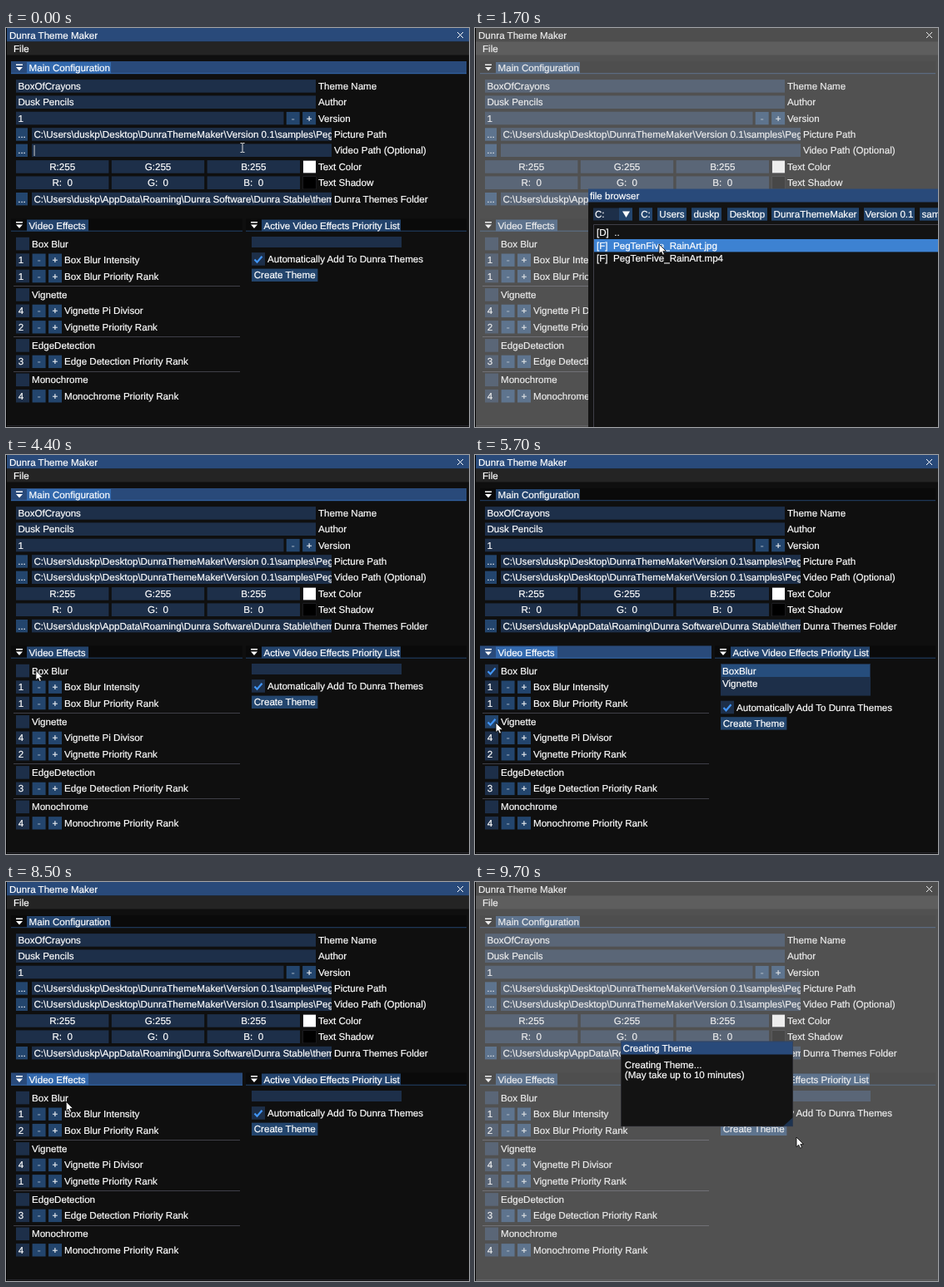
These frames come from a looping animation (556 by 480 pixels, 10000 ms). An HTML page:

```html
<!DOCTYPE html>
<html lang="en">
<head>
<meta charset="utf-8">
<title>Dunra Theme Maker</title>
<style>
  html, body { margin: 0; width: 100%; height: 100%; overflow: hidden; background: #000; }
  svg { display: block; width: 556px; height: 480px; }
  text {
    font: 11.6px "Liberation Sans", Arial, sans-serif;
    fill: #fff; stroke: #fff; stroke-width: .2px;
    white-space: pre; text-rendering: geometricPrecision;
  }
  .mid { text-anchor: middle; }
  .faint { opacity: .5; }
</style>
</head>
<body>
<svg id="stage" viewBox="0 0 556 480" xmlns="http://www.w3.org/2000/svg">
  <defs>
    <clipPath id="field"><rect x="31" y="60" width="360" height="160"/></clipPath>
  </defs>
  <g id="main"></g>
  <rect id="dim" x="1" width="555" height="480" fill="#ccc"/>
  <g id="browser"></g>
  <g id="progress"></g>
  <path id="arrow" d="M0 0V11.6L2.7 9.2 4.5 13.2 6.5 12.3 4.8 8.4H8.4Z" fill="#fff" stroke="#000" stroke-width=".8"/>
  <path id="beam" d="M-2.5-5.5H-.6L0-5 .6-5.5H2.5M0-5V5M-2.5 5.5H-.6L0 5 .6 5.5H2.5" fill="none" stroke="#ddd"/>
</svg>
<script>
const $ = id => document.getElementById(id);
const BG = '#0f0f0f', FRAME = '#1d2f49', BUTTON = '#23456d', TITLE = '#294a7a',
  IDLE_TITLE = '#0a0a0a', TAB = '#3369ad', IDLE_TAB = '#23436c',
  HOVER = '#387bcb', LINE = '#3f3f48', CHECK = '#4296fa';
let layer = $('main');
const hot = [];

function add(tag, attrs, parent = layer) {
  const el = document.createElementNS('http://www.w3.org/2000/svg', tag);
  for (const k in attrs) el.setAttribute(k, attrs[k]);
  parent.appendChild(el);
  return el;
}
const set = (el, k, v) => el.setAttribute(k, v);
const show = (el, on) => { el.style.display = on ? '' : 'none'; };
const box = (x, y, width, height, fill, parent) => add('rect', { x, y, width, height, fill }, parent);
const frame = (x, y, w, parent) => box(x, y - 7.9, w, 15.6, FRAME, parent);
const path = (d, fill, parent) => add('path', { d, fill }, parent);

// y is the vertical centre of the line
function label(s, x, y, cls = '', parent = layer) {
  const el = add('text', { x, y: y + 4, class: cls }, parent);
  el.textContent = s;
  return el;
}
function button(s, x, y, w, cls = 'mid') {
  const top = y - 7.7, h = 15.4;
  const r = box(x, top, w, h, BUTTON);
  hot.push({ r, x, y: top, w, h, cold: BUTTON, warm: HOVER });
  return [r, label(s, x + w / 2, y, cls)];
}
function checkbox(x, y, parent = layer) {
  const r = frame(x, y, 16, parent);
  hot.push({ r, x, y: y - 8, w: 16, h: 16, cold: FRAME, warm: BUTTON });
  return add('path', {
    d: `M${x + 3.5} ${y + .5}l3 3.2 6-7`, fill: 'none', stroke: CHECK, 'stroke-width': 2.2
  }, parent);
}
function spin(x, y) {
  button('-', x, y, 16, 'mid faint');
  button('+', x + 19.4, y, 16);
}
function panel(s, x, y, w, tabW) {
  const strip = box(x, y - 8, w, 15, IDLE_TITLE);
  const tab = box(x + 19, y - 7, tabW, 14, IDLE_TAB);
  const rule = box(x, y + 6.2, w, 1, IDLE_TAB);
  path(`M${x + 6} ${y - 4.5}h8v1.4h-8zM${x + 6} ${y - 1}h8l-4 4.5z`, '#fff');
  label(s, x + 21.6, y);
  return on => {
    set(strip, 'fill', on ? TITLE : IDLE_TITLE);
    set(tab, 'fill', on ? TAB : IDLE_TAB);
    set(rule, 'fill', on ? TAB : IDLE_TAB);
  };
}

// Window frame
box(1, 0, 555, 480, BG);
const titleBar = box(1, 0, 555, 16.5, TITLE);
label('Dunra Theme Maker', 4, 8.5);
add('path', { d: 'M542 5l7 7m0-7l-7 7', stroke: '#fff', 'stroke-width': 1 });
box(1, 16.5, 555, 16, '#242424');
label('File', 9, 25.3);
box(1, 478, 555, 1, '#26262b');

// Main configuration
const focusMain = panel('Main Configuration', 6, 48, 547, 101);
const folder = 'C:\\Users\\duskp\\Desktop\\DunraThemeMaker\\Version 0.1\\samples\\PegTenFive_RainArt';
[['BoxOfCrayons', 'Theme Name', 70], ['Dusk Pencils', 'Author', 89.3]].forEach(([v, name, y]) => {
  frame(12, y, 360);
  label(v, 14.5, y);
  label(name, 375, y);
});
frame(12, 108.6, 321.5);
label('1', 14.5, 108.6);
spin(336.7, 108.6);
label('Version', 375, 108.6);

function pathRow(v, name, y) {
  button('...', 12, y, 14);
  frame(31, y, 360);
  const g = add('g', { 'clip-path': 'url(#field)' });
  label(name, 394, y);
  return label(v, 33.4, y, '', g);
}
pathRow(folder + '.jpg', 'Picture Path', 128);
const videoPath = pathRow(folder + '.mp4', 'Video Path (Optional)', 147.3);
const caret = box(33.6, 141, .9, 13, '#ddd');
[[255, 'Text Color', 167, '#fff'], ['  0', 'Text Shadow', 186.3, '#000']].forEach(([v, name, y, c]) => {
  [...'RGB'].forEach((ch, i) => {
    const x = 12 + 114.8 * i;
    frame(x, y, 111.4);
    label(ch + ':' + v, x + 55.7, y, 'mid');
  });
  box(356.4, y - 7.9, 16, 15.6, '#29292e');
  box(357, y - 7.3, 15, 14.6, c);
  label(name, 375, y);
});
pathRow('C:\\Users\\duskp\\AppData\\Roaming\\Dunra Software\\Dunra Stable\\themes', 'Dunra Themes Folder', 205.7);

// Video effects
const focusFx = panel('Video Effects', 6, 237.5, 278, 74);
function rankRow(v, name, y) {
  frame(12, y, 16);
  const el = label(v, 14.7, y);
  spin(31.6, y);
  label(name, 70, y);
  return el;
}
function effect(name, y) {
  const mark = checkbox(12, y);
  label(name, 31, y);
  return mark;
}
const rule = y => box(9, y, 272, 1, LINE);
const blurMark = effect('Box Blur', 259.7);
rankRow('1', 'Box Blur Intensity', 279.2);
const blurRank = rankRow('1', 'Box Blur Priority Rank', 298.6);
rule(310);
const vigMark = effect('Vignette', 321);
rankRow('4', 'Vignette Pi Divisor', 340.4);
const vigRank = rankRow('2', 'Vignette Priority Rank', 359.8);
rule(371);
const edgeMark = effect('EdgeDetection', 382);
rankRow('3', 'Edge Detection Priority Rank', 401.4);
rule(413);
const monoMark = effect('Monochrome', 423.4);
rankRow('4', 'Monochrome Priority Rank', 442.8);
show(edgeMark, false);

// Priority list
panel('Active Video Effects Priority List', 288, 237.5, 265, 167);
const list = box(295, 251, 180, 13, FRAME);
const picked = box(296, 252, 178, 15, '#264d7c');
const items = [0, 1, 2].map(i => label('', 297, 259.7 + 15.6 * i));
const tail = add('g', {});
checkbox(295, 278, tail);
label('Automatically Add To Dunra Themes', 314, 278, '', tail);
button('Create Theme', 295, 297.3, 79.4).forEach(el => tail.appendChild(el));
// the two controls in the tail move with the list
const fixed = hot.filter(h => !tail.contains(h.r));

// File browser
layer = $('browser');
box(136, 194, 420, 286, '#131313');
box(136, 193.5, 420, 16, TITLE);
label('file browser', 138, 201.6);
box(142, 216.5, 47, 15, FRAME);
box(173, 216.5, 16, 15, BUTTON);
path('M177 220.5h9l-4.5 7.5z', '#fff');
label('C:', 144, 224);
[['C:', 197, 16], ['Users', 219, 35], ['duskp', 260, 36], ['Desktop', 303, 48],
 ['DunraThemeMaker', 356, 105], ['Version 0.1', 467, 61], ['samples', 534, 48]]
  .forEach(([s, x, w]) => button(s, x, 224, w));
add('path', { d: 'M556 236.5H142.5V480', fill: 'none', stroke: LINE });
const rowBar = box(143, 254, 413, 15.4, '#3d82d2');
['[D]  ..', '[F]  PegTenFive_RainArt.jpg', '[F]  PegTenFive_RainArt.mp4']
  .forEach((s, i) => label(s, 146, 246.4 + 15.4 * i));

// Progress dialog
layer = $('progress');
box(175, 192, 207, 102, '#131313');
box(175, 191.5, 207, 16, TITLE);
label('Creating Theme', 177.6, 199.6);
label('Creating Theme...', 179.8, 219.5);
label('(May take up to 10 minutes)', 179.8, 232.2);
path('M382 283v11h-12z', '#1d3350');
add('rect', { x: 175.5, y: 192, width: 206, height: 102, fill: 'none', stroke: LINE, opacity: .5 });

// Pointer stops: time, x, y
const stops = [
  [0, 284, 144], [200, 50, 148], [300, 50, 148], [400, 19, 146], [700, 19, 146],
  [1400, 221, 260], [2500, 221, 260], [2600, 243, 260], [2900, 243, 260], [3400, 234, 275],
  [3900, 234, 275], [4500, 20, 258], [5100, 20, 258], [5500, 25, 322], [5800, 25, 322],
  [6200, 59, 297], [6600, 59, 297], [7200, 18, 421], [7700, 18, 421], [7900, 20, 320],
  [8100, 20, 320], [8300, 20, 258], [8400, 20, 258], [8800, 354, 297], [9000, 354, 297],
  [9200, 388, 237], [9400, 402, 290], [9500, 400, 338], [9700, 386, 307], [10000, 386, 307]
];
function pointer(t) {
  const i = stops.findIndex(s => s[0] > t);
  const [t0, x0, y0] = stops[i - 1], [t1, x1, y1] = stops[i];
  const p = (t - t0) / (t1 - t0), e = p * p * (3 - 2 * p);
  return [x0 + (x1 - x0) * e, y0 + (y1 - y0) * e];
}
const within = (t, a, b) => t >= a && t < b;

function draw(t) {
  const browsing = within(t, 600, 3900), creating = t >= 8900;
  const modal = browsing || creating;
  const [x, y] = pointer(t);
  const blur = within(t, 4900, 8400), vig = within(t, 5600, 8100), mono = within(t, 7500, 7700);
  const swapped = t >= 6400;

  // windows
  show($('browser'), browsing);
  show($('progress'), creating);
  const since = browsing ? t - 580 : t - 8930;
  set($('dim'), 'opacity', modal ? .35 * Math.max(0, Math.min(1, since / 170)) : 0);
  set(titleBar, 'fill', modal ? IDLE_TITLE : TITLE);
  focusMain(!modal && t < 4900);
  focusFx(!modal && t >= 4900);

  // fields
  show(caret, t < 500);
  show(videoPath, t >= 3900);
  show(blurMark, blur);
  show(vigMark, vig);
  show(monoMark, mono);
  blurRank.textContent = swapped ? 2 : 1;
  vigRank.textContent = swapped ? 1 : 2;

  // list
  const names = [blur && 'BoxBlur', vig && 'Vignette'];
  if (swapped) names.reverse();
  const active = [...names, mono && 'Monochrome'].filter(Boolean);
  items.forEach((el, i) => { el.textContent = active[i] || ''; });
  set(list, 'height', 13 + 12.8 * active.length);
  show(picked, active.length > 0);
  set(tail, 'transform', `translate(0 ${12.8 * active.length})`);

  // pointer and hover
  fixed.forEach(h => set(h.r, 'fill',
    !modal && x >= h.x && x < h.x + h.w && y >= h.y && y < h.y + h.h ? h.warm : h.cold));
  const row = Math.floor((y - 238.6) / 15.4);
  show(rowBar, x > 143 && row >= 0 && row < 3);
  set(rowBar, 'y', 238.6 + 15.4 * row);
  const typing = t < 400;
  show($('beam'), typing);
  show($('arrow'), !typing);
  set($(typing ? 'beam' : 'arrow'), 'transform', `translate(${x} ${y})`);
}

const start = performance.now();
function tick() {
  const t = (performance.now() - start) % 10000;
  draw(Math.floor(t / 100) * 100);
  requestAnimationFrame(tick);
}
tick();
</script>
</body>
</html>
```
